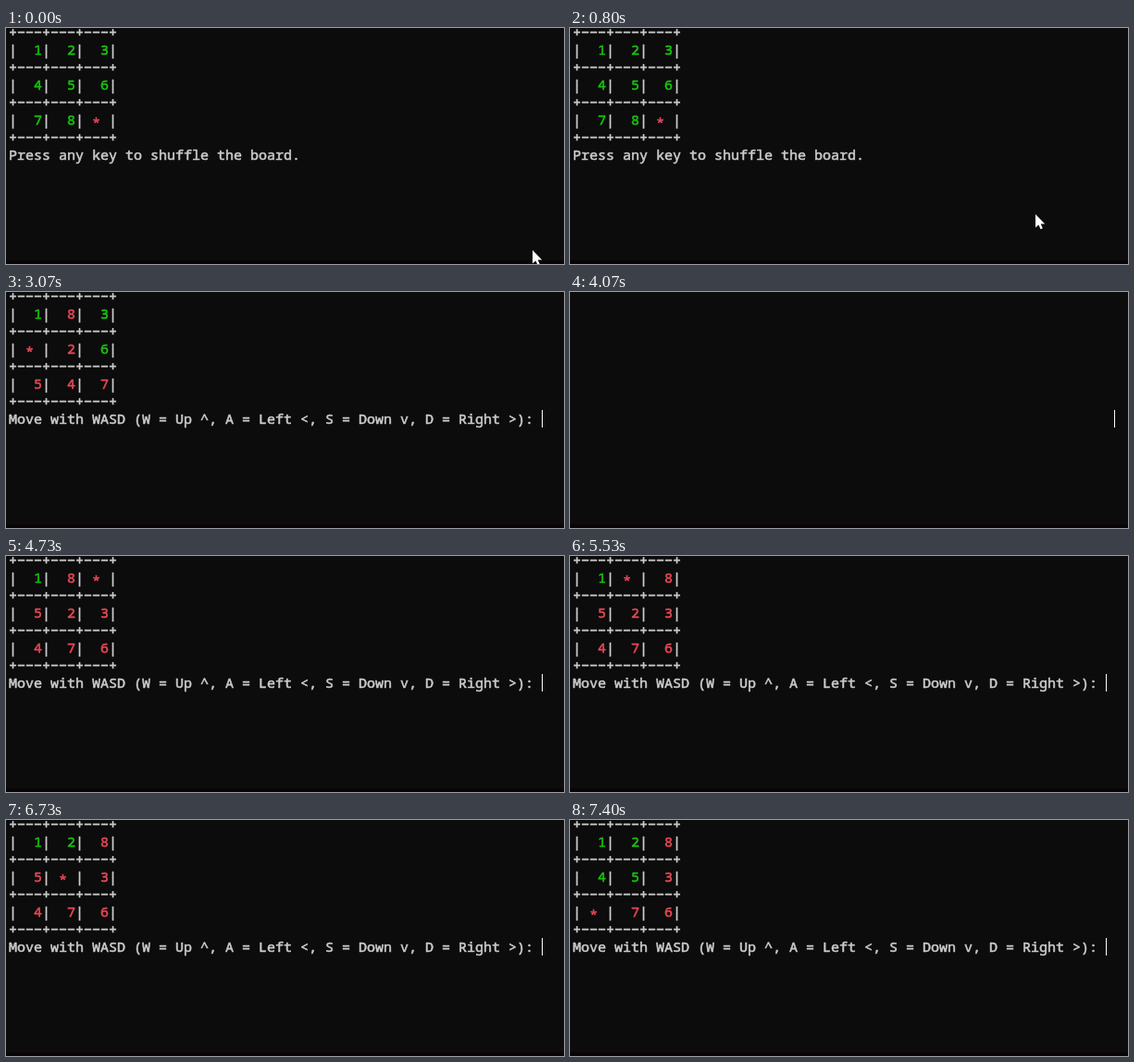
Recreate the animation shown at these times as an HTML page with a canvas. Size 603x256 px, loop 8000 ms.

```html
<!DOCTYPE html>
<html lang="en">
<head>
<meta charset="utf-8">
<title>Sliding puzzle in a terminal</title>
<style>
html, body { margin: 0; width: 603px; height: 256px; overflow: hidden; background: #0c0c0c; }
canvas { display: block; }
</style>
</head>
<body>
<canvas width="603" height="256"></canvas>
<script>
const ctx = document.querySelector('canvas').getContext('2d');
const LOOP = 8000, LEFT = 3, TOP = -5, CELL_W = 9, CELL_H = 19, BASELINE = 15;
const GOAL = '12345678*';
const GREY = '#cccccc', GREEN = '#16c60c', RED = '#e74856';

const start = 'Press any key to shuffle the board.';
const shuffled = [start, 'Shuffling board...', 'Shuffling complete. Press any key to begin game'];
const prompt = 'Move with WASD (W = Up ^, A = Left <, S = Down v, D = Right >): ';
const ready = [64, 7], typed = [65, 7];

const turn = board => ({ board, lines: [prompt], cursor: ready });
const cleared = { board: '', lines: [], cursor: typed };

// Each step changes only the named parts of the screen.
const steps = [
  [0, { board: GOAL, lines: [start], cursor: null, pointer: [569, 241] }],
  [70, { pointer: [536, 222] }],
  [130, { pointer: [503, 202] }],
  [270, { cursor: [0, 8] }],
  [800, { cursor: null }],
  [930, { lines: shuffled, cursor: [0, 10], pointer: null }],
  [1530, { cursor: null }],
  [1930, { cursor: [0, 10] }],
  [2000, turn('1832*6547')],
  [2530, { cursor: null }],
  [3070, turn('183*26547')],
  [3400, turn('183526*47')],
  [3730, turn('1835264*7')],
  [4070, cleared],
  [4130, turn('18352647*')],
  [4400, turn('18352*476')],
  [4730, turn('18*523476')],
  [4800, { lines: [prompt + 'w', 'Invalid move. Press any key to continue'], cursor: [0, 9] }],
  [5070, turn('18*523476')],
  [5530, turn('1*8523476')],
  [5870, cleared],
  [5930, turn('1285*3476')],
  [6270, turn('12853*476')],
  [6670, cleared],
  [6730, turn('1285*3476')],
  [7000, { lines: [prompt + 'a'], cursor: typed }],
  [7070, turn('128*53476')],
  [7400, turn('128453*76')]
];

// A thin outline gives the text its medium weight.
function write(text, col, row, color = GREY, dy = 0) {
  const x = LEFT + col * CELL_W, y = TOP + row * CELL_H + BASELINE + dy;
  ctx.fillStyle = ctx.strokeStyle = color;
  ctx.fillText(text, x, y);
  ctx.strokeText(text, x, y);
}

function drawBoard(board) {
  for (let row = 0; row < 7; row += 2) write('+−−−+−−−+−−−+', 0, row);
  for (let row = 1; row < 7; row += 2) write('|   |   |   |', 0, row);
  [...board].forEach((tile, i) => {
    const col = i % 3 * 4, row = Math.floor(i / 3) * 2 + 1;
    if (tile === '*') write(tile, col + 2, row, RED, 3);
    else write(tile, col + 3, row, tile === GOAL[i] ? GREEN : RED);
  });
}

function drawPointer([x, y]) {
  const arrow = new Path2D('M0 0V14.5L3.4 11.4L5.6 16.2L7.8 15.2L5.7 10.4H10.2Z');
  ctx.save();
  ctx.translate(x, y);
  ctx.fillStyle = '#ffffff';
  ctx.fill(arrow);
  ctx.restore();
}

function draw(now) {
  const time = now % LOOP;
  const screen = Object.assign({}, ...steps.filter(([at]) => at <= time).map(([, change]) => change));
  ctx.fillStyle = '#0c0c0c';
  ctx.fillRect(0, 0, 603, 256);
  ctx.fillStyle = '#0a0408';
  ctx.fillRect(0, 252, 603, 4);
  ctx.font = '15px "Noto Sans Mono", "DejaVu Sans Mono", monospace';
  ctx.lineWidth = 0.55;
  ctx.lineJoin = 'round';
  if (screen.board) drawBoard(screen.board);
  screen.lines.forEach((line, i) => write(line, 0, 7 + i));
  if (screen.cursor) {
    const [col, row] = screen.cursor;
    ctx.fillStyle = '#ffffff';
    ctx.fillRect(LEFT + col * CELL_W, TOP + row * CELL_H, 1, CELL_H);
  }
  if (screen.pointer) drawPointer(screen.pointer);
}

const begin = performance.now();
function tick() {
  draw(performance.now() - begin);
  requestAnimationFrame(tick);
}
tick();
</script>
</body>
</html>
```
